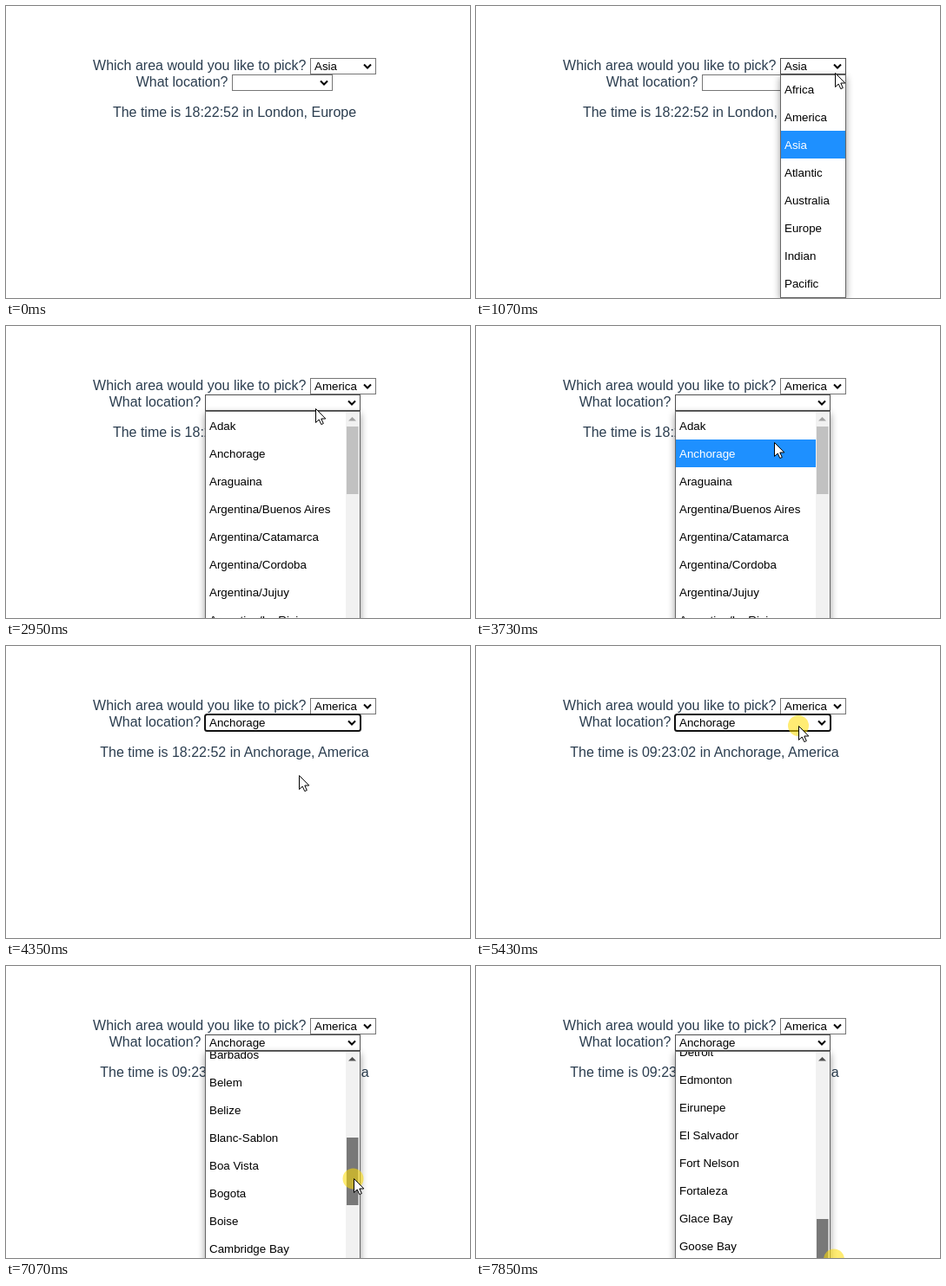
Animation of 534 by 337 pixels, one loop 8000 ms. Source, as an HTML page:

```html
<!DOCTYPE html>
<html lang="en">
<head>
<meta charset="utf-8">
<title>Time picker</title>
<style>
  html, body { margin: 0; width: 100%; height: 100%; overflow: hidden; background: #fff; }
  svg { display: block; width: 100%; height: 100%; }
  text { font-family: "Liberation Sans", Arial, sans-serif; white-space: pre; }
  .label { font-size: 16px; fill: #2c3e50; }
  .option { font-size: 13.333px; fill: #000; }
</style>
</head>
<body>
<svg id="stage" viewBox="0 0 534 337">
  <defs>
    <filter id="blur" x="-30%" y="-30%" width="160%" height="160%"><feGaussianBlur stdDeviation="4"/></filter>
    <clipPath id="listClip"><rect x="230" y="99" width="161" height="238"/></clipPath>
  </defs>
</svg>
<script>
const LOOP = 8000, ROW = 32, SCROLL_RATIO = 7.93, GRAB_Y = 163;
const stage = document.getElementById("stage");

const areas = "Africa,America,Asia,Atlantic,Australia,Europe,Indian,Pacific".split(",");
const places = ("Adak,Anchorage,Araguaina,Argentina/Buenos Aires,Argentina/Catamarca,Argentina/Cordoba," +
  "Argentina/Jujuy,Argentina/La Rioja,Argentina/Mendoza,Argentina/Rio Gallegos,Argentina/Salta," +
  "Argentina/San Juan,Argentina/San Luis,Argentina/Tucuman,Argentina/Ushuaia,Aruba,Asuncion,Atikokan," +
  "Bahia,Bahia Banderas,Barbados,Belem,Belize,Blanc-Sablon,Boa Vista,Bogota,Boise,Cambridge Bay," +
  "Campo Grande,Cancun,Caracas,Cayenne,Cayman,Chicago,Chihuahua,Costa Rica,Creston,Cuiaba,Curacao," +
  "Danmarkshavn,Dawson,Dawson Creek,Denver,Detroit,Edmonton,Eirunepe,El Salvador,Fort Nelson," +
  "Fortaleza,Glace Bay,Goose Bay,Grand Turk").split(",");

// Pointer moves: first step, last step, number of steps, end x, end y
const glides = [
  [70, 210, 3, 427, 53], [450, 610, 3, 419, 69], [1070, 1310, 4, 395, 101],
  [1470, 1630, 3, 390, 107], [1770, 1930, 3, 389, 120], [2250, 2790, 8, 356, 95],
  [3250, 3490, 4, 346, 126], [3730, 3870, 3, 337, 148.5], [4730, 5210, 7, 371, 92],
  [5590, 5670, 2, 397, 118], [5750, 5830, 2, 402, 167], [5990, 6050, 2, 401, 163],
  [6210, 6210, 1, 400, 163], [6610, 6690, 2, 400, 190], [6990, 7070, 2, 399.5, 245.4],
  [7150, 7230, 2, 403, 270], [7470, 7850, 6, 412, 338.5]
];
const presses = [[2090, 2180], [2870, 2950], [5430, 5510], [6370, LOOP]];
const areaHover = [[850, 2], [1150, 0], [1850, 1]];
const placeHover = [[2950, -1], [3250, 0], [3730, 1], [5510, 1], [5590, 0]];

function add(parent, tag, attrs = {}, text) {
  const el = document.createElementNS("http://www.w3.org/2000/svg", tag);
  set(el, attrs);
  if (text !== undefined) el.textContent = text;
  parent.appendChild(el);
  return el;
}
function set(el, attrs) {
  for (const name in attrs) el.setAttribute(name, attrs[name]);
}
function show(el, on) { el.style.display = on ? "" : "none"; }
const within = (t, from, to) => t >= from && t < to;

function label(x, y, anchor, text) {
  return add(stage, "text", { class: "label", x, y, "text-anchor": anchor }, text);
}

function makeSelect(y) {
  const box = add(stage, "rect", { y: y + 0.5, height: 18, fill: "#fff" });
  const value = add(stage, "text", { class: "option", y: y + 14 });
  const arrow = add(stage, "path", { d: "M-4-2 0 2 4-2", fill: "none", stroke: "#000", "stroke-width": 2 });
  const ring = add(stage, "rect", { y, height: 19, rx: 2.5, fill: "none", stroke: "#101010", "stroke-width": 2 });
  return (x, width, text, hover, focus) => {
    set(box, { x: x + 0.5, width: width - 1, stroke: hover ? "#4f4f4f" : "#767676" });
    set(value, { x: x + 5 });
    value.textContent = text;
    set(arrow, { transform: `translate(${x + width - 10} ${y + 9.5})` });
    set(ring, { x, width });
    show(ring, focus);
  };
}

function makeList(x, y, width, height, rowWidth, items, clip) {
  const root = add(stage, "g");
  add(root, "rect", { x, y: y + 3, width, height: height - 1, fill: "#000", opacity: 0.4, filter: "url(#blur)" });
  add(root, "rect", { x: x + 0.5, y: y + 0.5, width: width - 1, height: height - 1, fill: "#fff", stroke: "#666" });
  const frame = add(root, "g", clip ? { "clip-path": clip } : {});
  const rows = add(frame, "g");
  const mark = add(rows, "rect", { x: x + 1, width: rowWidth, height: ROW, fill: "#1e90ff" });
  const texts = items.map((name, i) =>
    add(rows, "text", { class: "option", x: x + 5, y: y + 22 + i * ROW }, name));
  const update = (open, active, scroll) => {
    show(root, open);
    if (!open) return;
    show(mark, active >= 0);
    set(mark, { y: y + 1 + active * ROW });
    texts.forEach((el, i) => { el.style.fill = i === active ? "#fff" : "#000"; });
    set(rows, { transform: `translate(0 ${-scroll})` });
  };
  return { root, update };
}

label(345.5, 74, "end", "Which area would you like to pick?");
const question = label(0, 93, "end", "What location?");
const answer = label(263, 128, "middle", "");
const areaSelect = makeSelect(60);
const placeSelect = makeSelect(79);
const areaList = makeList(350, 79, 76, 258, 74, areas);
const placeList = makeList(229, 98, 179, 260, 161, places, "url(#listClip)");
add(placeList.root, "rect", { x: 391, y: 99, width: 16, height: 238, fill: "#f1f1f1" });
const upArrow = add(placeList.root, "path", { d: "M394 109.5 398.5 105 403 109.5z" });
const thumb = add(placeList.root, "rect", { x: 392, width: 13.5, height: 78 });

const halo = add(stage, "circle", { r: 12, fill: "#ffdc00", opacity: 0.55 });
const pointer = add(stage, "path", {
  d: "M.5.5V16.5L4.2 13 6.8 18.6 9.3 17.5 6.8 12H11.8Z", fill: "#fff", stroke: "#000"
});

function pointerAt(t) {
  let x = 415, y = 349;
  for (const [from, to, steps, endX, endY] of glides) {
    if (t < from) break;
    const gap = steps > 1 ? (to - from) / (steps - 1) : 1;
    const part = Math.min(steps, Math.floor((t - from) / gap + 1e-6) + 1) / steps;
    x += (endX - x) * part;
    y += (endY - y) * part;
    if (part < 1) break;
  }
  return [x, y];
}
function latest(marks, t) {
  return marks.reduce((value, [at, next]) => t >= at ? next : value, -1);
}

function draw(t) {
  const [x, y] = pointerAt(t);
  const picked = t >= 2180, placed = t >= 4350;
  const areaOpen = within(t, 850, 2180);
  const placeOpen = within(t, 2950, 4350) || t >= 5510;
  const [left, width] = picked ? [229, 179] : [260, 116];
  const over = (sx, sy, sw) => within(x, sx, sx + sw) && within(y, sy, sy + 19);

  set(question, { x: left - 4.5 });
  answer.textContent = `The time is ${t < 4430 ? "18:22:52" : "09:23:02"} in ` +
    (placed ? "Anchorage, America" : "London, Europe");
  areaSelect(350, 76, picked ? "America" : "Asia", areaOpen || over(350, 60, 76), within(t, 2180, 2870));
  placeSelect(left, width, placed ? "Anchorage" : "", placeOpen || over(left, 79, width), within(t, 4350, 5510));

  const drag = t >= 6370 ? y - GRAB_Y : 0;
  areaList.update(areaOpen, latest(areaHover, t), 0);
  placeList.update(placeOpen, latest(placeHover, t), Math.round(drag * SCROLL_RATIO));
  set(thumb, { y: Math.round(116 + drag), fill: t >= 6370 ? "#787878" : t >= 5750 ? "#a8a8a8" : "#c1c1c1" });
  set(upArrow, { fill: drag > 0 ? "#505050" : "#a3a3a3" });

  show(pointer, t >= 70);
  show(halo, presses.some(([from, to]) => within(t, from, to)));
  set(pointer, { transform: `translate(${Math.round(x)} ${Math.round(y)})` });
  set(halo, { cx: x, cy: y });
}

const start = performance.now();
function tick() {
  draw((performance.now() - start) % LOOP);
  requestAnimationFrame(tick);
}
tick();
</script>
</body>
</html>
```
